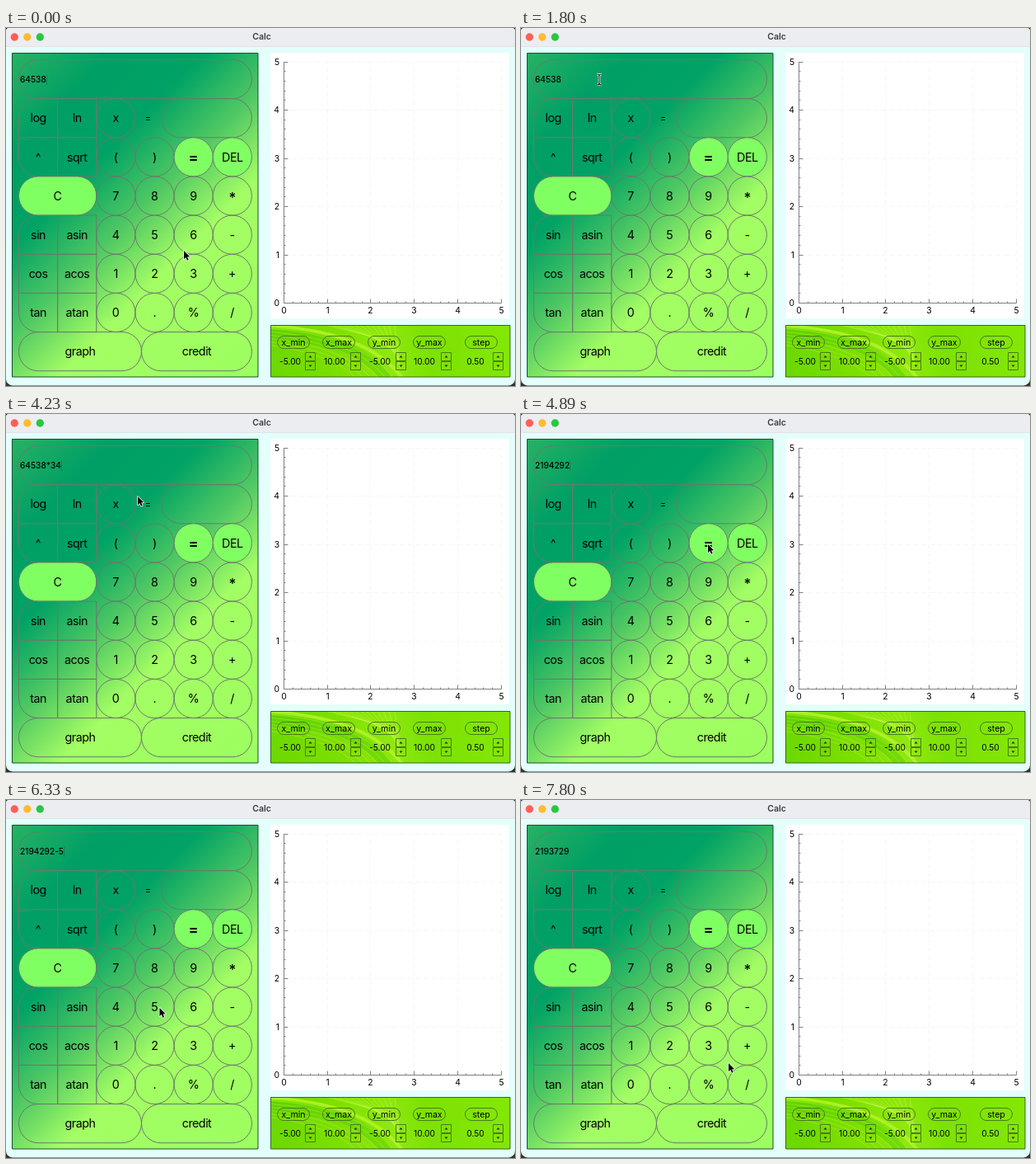
Animation, 618 px wide and 434 px high, one loop 8 s. Source, as an HTML page with a canvas:

```html
<!DOCTYPE html>
<html lang="en">
<head>
<meta charset="utf-8">
<title>Calc</title>
<style>
html, body { margin: 0; width: 100%; height: 100%; overflow: hidden; background: #e3fefb; }
canvas { display: block; }
</style>
</head>
<body>
<canvas id="stage" width="618" height="434"></canvas>
<script>
const W = 618, H = 434, LOOP = 8000, STEP = 30;
const stage = document.getElementById('stage').getContext('2d');
const backdrop = document.createElement('canvas');
backdrop.width = W;
backdrop.height = H;
const FONT = 'Inter, Roboto, sans-serif';
const LINE = '#6b7a6c';
const CELL = 47.15, R = 23.5, LEFT = 15.5, TOP = 38.5;

// column, row, label, options: w, r (corner radii), fill, size, weight
const KEYS = [
  [0, 1, 'log', { r: [R, 0, 0, 0] }], [1, 1, 'ln', { r: 0 }], [2, 1, 'x'],
  [0, 2, '^', { r: [0, 0, 0, R] }], [1, 2, 'sqrt', { r: 0 }], [2, 2, '('], [3, 2, ')'],
  [4, 2, '=', { fill: '#80ff62', size: 18, weight: 600 }], [5, 2, 'DEL', { fill: '#80ff62' }],
  [0, 3, 'C', { w: 2 * CELL, fill: '#80ff62' }],
  [0, 4, 'sin', { r: [R, 0, 0, 0] }], [1, 4, 'asin', { r: 0 }],
  [0, 5, 'cos', { r: 0 }], [1, 5, 'acos', { r: 0 }],
  [0, 6, 'tan', { r: [0, 0, 0, R] }], [1, 6, 'atan', { r: 0 }],
  [0, 7, 'graph', { w: 149 }], [3.16, 7, 'credit', { w: 134 }]
];
['789*', '456-', '123+', '0.%/'].forEach((row, j) => {
  [...row].forEach((c, i) => KEYS.push([2 + i, 3 + j, c, c === '*' ? { size: 17, weight: 500 } : {}]));
});

function text(c, s, x, y, size, align = 'center', weight = 400, gap = 0, color = '#000') {
  c.font = `${weight} ${size}px ${FONT}`;
  c.letterSpacing = gap + 'px';
  c.textAlign = align;
  c.fillStyle = color;
  c.fillText(s, x, y + size * 0.36);
}

function box(c, x, y, w, h, r, fill, stroke = LINE) {
  c.beginPath();
  c.roundRect(x, y, w, h, r);
  if (fill) { c.fillStyle = fill; c.fill(); }
  if (stroke) { c.strokeStyle = stroke; c.lineWidth = 1; c.stroke(); }
}

function line(c, x1, y1, x2, y2, color) {
  c.strokeStyle = color;
  c.lineWidth = 1;
  c.beginPath();
  c.moveTo(x1, y1);
  c.lineTo(x2, y2);
  c.stroke();
}

function blend(c, x1, y1, x2, y2, stops) {
  const g = c.createLinearGradient(x1, y1, x2, y2);
  stops.forEach(s => g.addColorStop(...s));
  return g;
}

function drawKey(c, [col, row, label, o = {}], fill = o.fill) {
  const x = LEFT + col * CELL, y = TOP + row * CELL, w = o.w || CELL;
  box(c, x, y, w, CELL, o.r ?? R, fill);
  const drop = label === '*' ? 2 : 0;
  text(c, label, x + w / 2, y + R + 0.2 + drop, o.size || 14.3, 'center', o.weight, label.length > 1 ? -0.5 : 0);
}

function drawTitleBar(c) {
  c.fillStyle = '#ecedf1';
  c.fillRect(0, 0, W, 22);
  c.fillStyle = '#dfe5e6';
  c.fillRect(0, 22, W, 1);
  ['#ff5f57', '#febb2e', '#28c840'].forEach((color, i) => {
    c.beginPath();
    c.arc(10.3 + i * 15.5, 11, 4.7, 0, 7);
    c.fillStyle = color;
    c.fill();
  });
  text(c, 'Calc', 310.5, 10.5, 10.5, 'center', 600, 0, '#3b3b3d');
}

function drawKeypad(c) {
  const fill = blend(c, 7, 30, 353, 376, [[0, '#28b264'], [0.18, '#009f65'], [0.34, '#00a265'],
    [0.5, '#50c863'], [0.65, '#a3fd64'], [1, '#9dff5f']]);
  box(c, 7.5, 30.5, 298.5, 392.5, 0, fill, '#16502d');
  box(c, LEFT, TOP, 6 * CELL, CELL, R);
  box(c, 188.7, TOP + CELL, 109.7, CELL, R);
  text(c, '=', 172.3, 109.5, 11);
  KEYS.forEach(k => drawKey(c, k));
}

function drawChart(c) {
  c.fillStyle = '#fff';
  c.fillRect(321, 30, 290, 322);
  const x0 = 337.5, y0 = 333.5, dx = 52.7, dy = 58.5, axis = '#808080';
  const px = i => Math.floor(x0 + dx * i) + 0.5, py = i => Math.floor(y0 - dy * i) + 0.5;
  c.setLineDash([5, 2, 1, 2]);
  for (let i = 1; i <= 5; i++) {
    line(c, px(i), y0, px(i), 41, '#f5f5f5');
    line(c, x0, py(i), 601, py(i), '#f5f5f5');
  }
  c.setLineDash([]);
  line(c, x0, 41, x0, y0, axis);
  line(c, x0, y0, 601.5, y0, axis);
  for (let n = 0; n <= 25; n++) {
    const len = n % 5 ? 2 : 5, i = n / 5;
    line(c, px(i), y0, px(i), y0 - len, axis);
    line(c, x0, py(i), x0 + len, py(i), axis);
    if (n % 5 === 0) {
      text(c, i, px(i), 342.3, 10.3);
      text(c, i, 332, py(i), 10.3, 'right');
    }
  }
}

function drawRange(c) {
  c.save();
  c.beginPath();
  c.rect(321, 360, 291, 63);
  c.clip();
  c.fillStyle = blend(c, 321, 423, 612, 360, [[0, '#6ad800'], [0.3, '#7ee000'], [0.5, '#8fe80e'],
    [0.65, '#7ce203'], [1, '#84e806']]);
  c.fillRect(321, 360, 291, 63);
  const sweep = (y, mx, my, ex, color, width) => {
    c.beginPath();
    c.moveTo(318, y);
    c.quadraticCurveTo(mx, my, ex, 425);
    c.strokeStyle = color;
    c.lineWidth = width;
    c.stroke();
  };
  sweep(372, 425, 375, 462, 'rgba(80,200,0,.4)', 13);
  sweep(361, 438, 367, 482, 'rgba(182,244,44,.75)', 4);
  for (let i = 0; i < 7; i++) sweep(360 + i * 4, 435 - i * 6, 366 + i * 5, 480 - i * 9, 'rgba(196,248,64,.4)', 1);
  for (let i = 0; i < 13; i++) line(c, 388 + i * 7, 360, 478, 382 + i * 2.5, 'rgba(204,250,86,.4)');
  c.restore();
  box(c, 321.5, 360.5, 290.5, 62.5, 0, null, '#2f6a12');

  [['x_min', 349, '-5.00', 345, 363], ['x_max', 404, '10.00', 399, 418], ['y_min', 459, '-5.00', 454, 473],
   ['y_max', 514, '10.00', 508, 528], ['step', 577, '0.50', 570, 591]].forEach(([name, nx, value, vx, sx]) => {
    box(c, nx - 19.5, 373.5, 39, 15, 7.5, null, '#4c7a20');
    text(c, name, nx, 380.8, 10.6);
    text(c, value, vx, 404.3, 10.2);
    [0, 1].forEach(k => {
      const y = 393.5 + k * 11, s = k ? 1 : -1;
      box(c, sx + 0.5, y, 12, 10, 0, null, '#4c7a20');
      c.fillStyle = '#193600';
      c.beginPath();
      c.moveTo(sx + 4.5, y + 5 - s);
      c.lineTo(sx + 8.5, y + 5 - s);
      c.lineTo(sx + 6.5, y + 5 + s * 1.5);
      c.fill();
    });
  });
}

function drawBackdrop() {
  const c = backdrop.getContext('2d');
  c.fillStyle = '#2c3333';
  c.fillRect(0, 0, W, H);
  c.beginPath();
  c.roundRect(0, 0, W, 433.4, [4, 4, 8, 8]);
  c.clip();
  c.fillStyle = '#e3fefb';
  c.fillRect(0, 0, W, H);
  drawTitleBar(c);
  drawKeypad(c);
  drawChart(c);
  drawRange(c);
}

// time, x, y
const PATH = [
  [0, 216, 270], [810, 95, 62], [4050, 95, 62], [4230, 160, 100], [4410, 160, 100],
  [4710, 227, 158], [4920, 227, 158], [5130, 225, 268], [5280, 225, 268], [5460, 223, 289],
  [5640, 223, 289], [5850, 274, 251], [5970, 274, 252], [6180, 181, 252],
  [6300, 182, 252], [6450, 225, 253], [6540, 225, 254], [6750, 222, 299], [6900, 222, 299],
  [7290, 226, 162], [7470, 226, 162], [7800, 252, 319]
];
const HIDDEN = [2190, 4080];
const PRESSES = [[4740, 4890, '='], [5850, 5940, '-'], [6180, 6270, '5'],
                 [6450, 6540, '6'], [6750, 6870, '3'], [7320, 7440, '=']];
const ENTRIES = [[0, '64538'], [2190, '64538*'], [3600, '64538*3'], [3870, '64538*34'],
                 [4890, '2194292'], [5940, '2194292-'], [6270, '2194292-5'], [6540, '2194292-56'],
                 [6870, '2194292-563'], [7440, '2193729']];
const CARET = [[0, 330], [840, 1470], [1860, 2690], [3240, 4380], [4890, 5390], [5850, 7040], [7440, 7790]];

const during = (t, [a, b]) => t >= a && t < b;

function pointer(t) {
  const i = PATH.findIndex(p => p[0] > t);
  if (i < 0) return PATH[PATH.length - 1].slice(1);
  const [ta, xa, ya] = PATH[i - 1], [tb, xb, yb] = PATH[i];
  const u = (t - ta) / (tb - ta), e = u * u * (3 - 2 * u);
  return [xa + (xb - xa) * e, ya + (yb - ya) * e];
}

function drawArrow(c, x, y) {
  c.beginPath();
  [[0, 0], [0, 10.2], [2.3, 8], [4, 11.8], [5.7, 11], [4.1, 7.4], [7.2, 7.2]]
    .forEach(([dx, dy]) => c.lineTo(x + dx, y + dy));
  c.closePath();
  c.lineJoin = 'round';
  c.strokeStyle = '#fff';
  c.lineWidth = 1.5;
  c.stroke();
  c.fillStyle = '#000';
  c.fill();
}

function drawBeam(c, x, y) {
  [['#fff', 2.6], ['#111', 1.1]].forEach(([color, width]) => {
    c.strokeStyle = color;
    c.lineWidth = width;
    c.beginPath();
    [-3, 3].forEach(dx => {
      c.moveTo(x + dx, y - 6);
      c.quadraticCurveTo(x, y - 6, x, y - 4);
      c.lineTo(x, y + 5);
      c.quadraticCurveTo(x, y + 7, x + dx, y + 7);
    });
    c.stroke();
  });
}

function drawRing(c, x, y) {
  [['#e8fff0', 3.4], ['#0a1a12', 1.8]].forEach(([color, width]) => {
    c.beginPath();
    c.arc(x, y, 16.5, 0, 7);
    c.strokeStyle = color;
    c.lineWidth = width;
    c.stroke();
  });
}

// Set one character at a time so operators keep their plain shapes.
function drawEntry(c, entry) {
  let x = 17;
  for (const ch of entry) {
    text(c, ch, x, 62.3, 10.1, 'left', 450);
    x += c.measureText(ch).width;
  }
  return x;
}

function render(t) {
  const c = stage;
  c.drawImage(backdrop, 0, 0);
  const press = PRESSES.find(p => during(t, p));
  if (press) drawKey(c, KEYS.find(k => k[2] === press[2]), '#08cd70');

  const end = Math.round(drawEntry(c, ENTRIES.filter(e => e[0] <= t).pop()[1])) + 0.5;
  if (CARET.some(s => during(t, s))) line(c, end, 56, end, 69, 'rgba(60,60,50,.4)');

  if (during(t, HIDDEN)) return;
  const [x, y] = pointer(t);
  if (press) drawRing(c, x, y + 1);
  (y < 85 ? drawBeam : drawArrow)(c, x, y);
}

drawBackdrop();
const start = performance.now();
function tick() {
  const t = (performance.now() - start) % LOOP;
  render(Math.floor(t / STEP) * STEP);
  requestAnimationFrame(tick);
}
tick();
</script>
</body>
</html>
```
